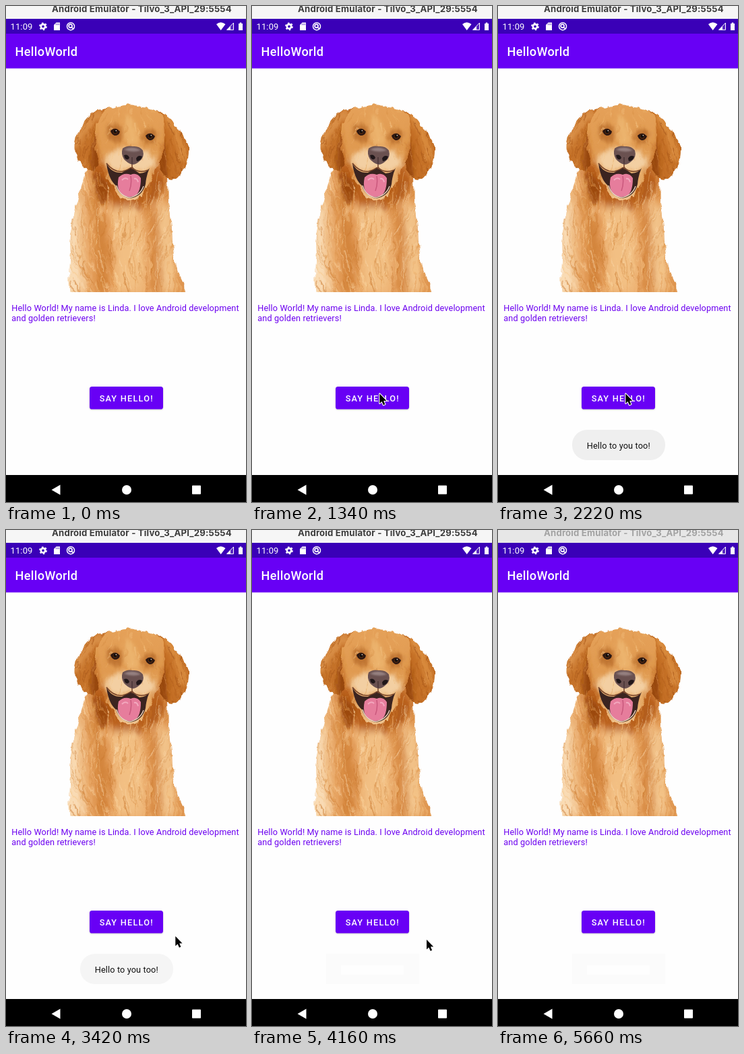
An HTML page for the animation above (5680 ms loop, 356x735 px).

```html
<!DOCTYPE html>
<html lang="en">
<head>
<meta charset="utf-8">
<title>HelloWorld</title>
<style>
  html, body { margin: 0; width: 100%; height: 100%; overflow: hidden; background: #fefefe; }
  svg { display: block; width: 100vw; height: 100vh; }
  text { font-family: Roboto, sans-serif; font-size: 12.7px; letter-spacing: .13px; white-space: pre; }
  .medium { font-weight: 500; fill: #fff; }
  #windowTitle { font: 700 13.2px Inter, sans-serif; letter-spacing: .17px; }
</style>
</head>
<body>
<svg viewBox="0 0 356 735">
  <defs>
    <filter id="soft" x="-30%" y="-30%" width="160%" height="160%"><feGaussianBlur stdDeviation="3"/></filter>
    <filter id="softer" x="-40%" y="-40%" width="180%" height="180%"><feGaussianBlur stdDeviation="6"/></filter>
    <filter id="shadow" x="-10%" y="-20%" width="120%" height="160%"><feGaussianBlur stdDeviation=".9"/></filter>
    <filter id="shaggy" x="-5%" y="-5%" width="110%" height="110%" color-interpolation-filters="sRGB">
      <feTurbulence type="fractalNoise" baseFrequency=".14 .06" numOctaves="2" seed="4"/>
      <feDisplacementMap in="SourceGraphic" scale="8" xChannelSelector="R" yChannelSelector="G"/>
    </filter>
    <linearGradient id="coat" x1="0" x2="1">
      <stop offset="0" stop-color="#f3c894"/><stop offset=".25" stop-color="#e49a55"/>
      <stop offset=".6" stop-color="#eaa968"/><stop offset="1" stop-color="#dc9048"/>
    </linearGradient>
    <linearGradient id="face" x1="0" y1="0" x2="0" y2="1">
      <stop offset="0" stop-color="#e5a159"/><stop offset=".45" stop-color="#e09a50"/>
      <stop offset="1" stop-color="#edba7e"/>
    </linearGradient>
    <path id="bodyShape" d="M130 222Q111 252 110 276Q99 304 97 330Q93 348 95 366Q92 396 95 430H268Q263 406 254 394Q249 376 247 352Q246 318 241 292Q240 268 240 235Z"/>
    <path id="headShape" d="M146 153Q160 150 176 147Q186 145 198 149Q217 151 230 160Q236 178 235 198Q234 224 222 240Q216 260 207 270Q200 288 182 289Q165 286 158 266Q145 252 140 236Q130 214 134 186Q136 164 146 153Z"/>
    <path id="leftEar" d="M152 151Q138 151 128 159Q112 173 106 190Q99 205 103 217Q105 233 119 242Q131 246 138 236Q146 212 144 192Q144 171 152 151Z"/>
    <path id="rightEar" d="M222 154Q242 162 250 176Q264 192 271 207Q272 224 266 240Q258 255 246 258Q235 255 228 240Q225 221 227 200Q227 174 222 154Z"/>
    <clipPath id="bodyClip"><use href="#bodyShape"/></clipPath>
    <clipPath id="headClip"><use href="#headShape"/></clipPath>
    <clipPath id="leftClip"><use href="#leftEar"/></clipPath>
    <clipPath id="rightClip"><use href="#rightEar"/></clipPath>
    <clipPath id="photoClip"><rect x="85" y="140" width="195" height="284"/></clipPath>
  </defs>

  <rect width="356" height="735" fill="#fefefe"/>
  <rect id="titleBar" width="356" height="19"/>
  <text id="windowTitle" x="68" y="9">Android Emulator - Tilvo_3_API_29:5554</text>

  <rect y="19" width="356" height="22.5" fill="#3a00b7"/>
  <rect y="41" width="356" height="51.5" fill="#6800f5"/>
  <text x="6.5" y="35" fill="#fff" style="font-size:13px">11:09</text>
  <g fill="none" stroke="#fff">
    <circle cx="55" cy="30.3" r="3.2" stroke-width="2.6"/>
    <circle cx="55" cy="30.3" r="5" stroke-width="1.8" stroke-dasharray="2.5 2.736"/>
    <circle cx="96" cy="30.2" r="5.5" stroke-width="1.5"/>
    <circle cx="95.6" cy="29.6" r="2.5" stroke-width="1.7"/>
    <path d="M97 31L100.3 34.5" stroke-width="1.7"/>
  </g>
  <path d="M74.5 24.5H80V36H71V28ZM312 27Q318.5 21.5 325.5 27L318.7 36ZM345 26H346.7V24.5H349.3V26H351V36H345Z" fill="#fff"/>
  <path d="M327.5 35.3L337.5 25V35.3Z" fill="#fff" fill-opacity=".15" stroke="#fff"/>
  <path d="M328 35.3L333 30V35.3Z" fill="#fff"/>
  <path d="M74.3 26V28.3M76.4 26V28.3M78.4 26V28.3" stroke="#3a00b7" stroke-width=".7"/>
  <text class="medium" x="13.5" y="74" style="font-size:18.13px;letter-spacing:.35px">HelloWorld</text>

  <g clip-path="url(#photoClip)">
    <g filter="url(#shaggy)">
      <use href="#bodyShape" fill="url(#coat)"/>
      <g clip-path="url(#bodyClip)">
        <g filter="url(#softer)">
          <path d="M122 230Q140 296 184 306Q226 296 240 258L225 230Z" fill="#b9601b"/>
          <path d="M150 300Q166 334 160 424H202Q212 350 192 296Z" fill="#f2bf83"/>
          <path d="M226 290Q220 350 232 424H252L246 300Z" fill="#f3c48b"/>
          <path d="M206 300Q224 350 214 424H228Q232 350 222 296Z" fill="#d38238"/>
          <path d="M120 284Q142 340 134 424H150Q158 340 132 276Z" fill="#d08139"/>
          <path d="M108 290Q104 350 116 424H88V320Z" fill="#f9dcb6"/>
        </g>
        <path d="M132 242Q126 270 142 294Q155 285 152 262Z" fill="#9c480f" filter="url(#soft)"/>
        <path d="M213 260Q212 284 203 297Q226 288 230 258Z" fill="#b35d1a" filter="url(#soft)"/>
        <g id="bodyFur" fill="none" stroke-linecap="round"></g>
      </g>

      <use href="#leftEar" fill="#c57229"/>
      <g clip-path="url(#leftClip)">
        <path d="M136 180Q126 205 126 248H146V180Z" fill="#97470f" filter="url(#soft)"/>
        <path d="M102 210Q112 180 140 158" fill="none" stroke="#d98f47" stroke-width="12" filter="url(#soft)"/>
        <g id="leftFur" fill="none"></g>
      </g>
      <use href="#rightEar" fill="#c46f25"/>
      <g clip-path="url(#rightClip)">
        <path d="M228 180Q244 215 238 260H222Z" fill="#97470f" filter="url(#soft)"/>
        <path d="M236 160Q258 190 264 230" fill="none" stroke="#d98b3e" stroke-width="11" filter="url(#soft)"/>
        <g id="rightFur" fill="none"></g>
      </g>

      <use href="#headShape" fill="url(#face)"/>
      <g clip-path="url(#headClip)">
        <g filter="url(#soft)">
          <path d="M130 170Q136 226 150 244L155 258L130 252ZM238 168Q232 228 216 256L226 258L242 226Z" fill="#c16b22"/>
          <path d="M178 158Q196 170 197 206H180Q174 180 178 158Z" fill="#ecb36d"/>
          <path d="M150 178Q159 171 169 177Q178 195 170 202Q154 203 150 190ZM204 186Q216 179 223 187Q225 199 214 205Q201 202 201 193Z" fill="#bf7430"/>
          <path d="M173 211Q148 215 147 231Q159 250 184 240Q207 251 222 235Q219 217 200 211Z" fill="#f3cfa2"/>
          <path d="M167 282Q185 295 200 280L202 290H167Z" fill="#f4d7ae"/>
        </g>
        <g id="headFur" fill="none"></g>
      </g>
    </g>

    <path d="M149 233Q156 248 172 247L185 239L198 248Q209 247 213 240Q208 251 207 264Q202 283 183 285Q167 281 163 266Q152 257 149 233Z" fill="#3b2420"/>
    <path d="M167 254Q175 246 185 250Q194 246 200 255Q200 274 193 280Q183 286 173 280Q163 272 167 254Z" fill="#e67d9c"/>
    <path d="M185 252Q187 264 183 274" fill="none" stroke="#c9587c" stroke-width="1.5"/>
    <path d="M172 258Q177 253 181 257M190 256Q195 255 196 261" fill="none" stroke="#f3a9bf" stroke-width="2"/>
    <path d="M164 266Q168 281 183 284Q199 281 204 267" fill="none" stroke="#ead2bd" stroke-width="1.4"/>
    <path d="M187 232V242M149 233Q160 247 173 245Q181 243 187 239Q196 249 211 243" fill="none" stroke="#744229" stroke-width="1.5"/>
    <path d="M173 211Q180 206 188 208Q198 207 203 214Q206 224 198 230Q193 235 187 235Q179 232 175 227Q170 219 173 211Z" fill="#6a5150"/>
    <path d="M175 213Q187 206 200 214Q188 218 175 213Z" fill="#948080" filter="url(#shadow)"/>
    <path d="M175 221Q181 219 183 225Q180 230 176 225ZM193 226Q196 220 202 223Q200 230 194 230Z" fill="#201719"/>
    <path d="M187 224V234" stroke="#382728"/>
    <g fill="#2a1611">
      <path d="M155 185Q162 178 169 186Q168 192 161 192Q156 190 155 185Z"/>
      <path d="M207 192Q214 185 221 193Q219 199 213 199Q208 197 207 192Z"/>
    </g>
    <g fill="#53290f"><circle cx="162" cy="186.5" r="3.2"/><circle cx="214" cy="193.5" r="3.2"/></g>
    <g fill="#110d0c"><circle cx="162" cy="186" r="2.4"/><circle cx="214" cy="193" r="2.4"/></g>
    <g fill="#fff"><circle cx="163.3" cy="184.7" r=".8"/><circle cx="215.3" cy="191.7" r=".8"/></g>
  </g>

  <g fill="#6c00f0">
    <text x="8.3" y="452">Hello World! My name is Linda. I love Android development</text>
    <text x="8.3" y="467">and golden retrievers!</text>
  </g>

  <rect x="124" y="565" width="109" height="33.3" rx="3.6" fill="#000" opacity=".22" filter="url(#shadow)"/>
  <rect id="button" x="124" y="564" width="109" height="33.5" rx="3.6"/>
  <text class="medium" x="138.7" y="585.5" style="letter-spacing:1.24px">SAY HELLO!</text>

  <rect id="toast" x="110" y="628" width="138" height="45"/>
  <rect id="toastGap" x="132" y="645" width="93" height="14" fill="#fefefe"/>
  <text id="toastText" x="131.8" y="655.5" fill="#111">Hello to you too!</text>

  <rect y="695" width="356" height="40" fill="#000"/>
  <g fill="#fff">
    <path d="M67.5 717L80.5 709.5V724.5Z"/>
    <circle cx="179" cy="717" r="7"/>
    <rect x="276" y="710.5" width="13" height="13" rx=".8"/>
  </g>
  <path id="cursor" d="M0 0V14.5L3.3 11.5L5.6 16.8L8.1 15.7L5.9 10.5H10.2Z" fill="#000" stroke="#fff" stroke-width="2.2" paint-order="stroke" stroke-linejoin="round"/>
</svg>
<script>
const LOOP = 5680;
const $ = id => document.getElementById(id);

// Each entry holds from its time until the next one.
const cursorPath = [
  [0], [600, 162.5, 660.5], [740, 172.5, 584.5], [890, 188.5, 576], [1040, 189.3, 574.5],
  [3120, 204.5, 578.5], [3270, 233, 589.5], [3420, 251.3, 602], [3570, 259, 607],
  [4460, 261.5, 607.5], [4610, 317.5, 637.5], [4760, 329.5, 695.5], [4910, 329.5, 732], [5060]
];
const textFade = [
  [0, 0], [1630, .25], [1780, .5], [1930, .7], [2070, .88], [2220, 1],
  [3570, .8], [3710, .58], [3860, .36], [4010, .16], [4160, 0]
];
const toastFill = [[0, 'none'], [1630, '#efefef'], [3420, '#f5f5f5'], [3570, '#fbfbfb']];

const stepAt = (steps, t) => steps.findLast(step => step[0] <= t);
const set = (id, attrs) => {
  for (const name in attrs) $(id).setAttribute(name, attrs[name]);
};

function seeded(seed) {
  return () => (seed = (seed * 16807) % 2147483647) / 2147483647;
}

function growFur(id, count, [x, y, w, h], length, colors, lean) {
  const random = seeded(count * 97 + x);
  let strands = '';
  for (let i = 0; i < count; i++) {
    const sx = x + random() * w, sy = y + random() * h;
    const size = length * (.5 + random());
    const dx = lean(sx, sy) * size, bend = (random() - .5) * size * .5;
    const color = colors[Math.floor(random() * colors.length)];
    strands += `<path d="M${sx} ${sy}q${bend} ${size / 2} ${dx} ${size}" stroke="${color}"
      stroke-width="${.6 + random() * 1.4}" opacity="${.15 + random() * .35}"/>`;
  }
  $(id).innerHTML = strands;
}

const earColors = ['#94450f', '#df9a54', '#b3611d'];
growFur('bodyFur', 420, [90, 245, 178, 175], 24, ['#fbdcb0', '#c67429', '#f5c486', '#dc9045'],
  (x, y) => (180 - x) / 260 + Math.sin(y / 28) * .25);
growFur('leftFur', 80, [100, 150, 45, 90], 14, earColors, () => -.3);
growFur('rightFur', 80, [228, 155, 45, 100], 14, earColors, () => .3);
growFur('headFur', 110, [132, 146, 104, 140], 9, ['#f4c78a', '#c97d35', '#edb56e'],
  x => (x - 184) / 60);

function draw(t) {
  const [, x, y] = stepAt(cursorPath, t);
  set('cursor', x === undefined ? { visibility: 'hidden' }
    : { visibility: 'visible', transform: `translate(${x} ${y})` });

  const faded = t >= 4160;
  set('toast', { fill: stepAt(toastFill, t)[1], rx: faded ? 0 : 22 });
  set('toastGap', { visibility: faded ? 'visible' : 'hidden' });
  set('toastText', { opacity: stepAt(textFade, t)[1] });
  set('button', { fill: t >= 1630 && t < 1780 ? '#7a26f6' : '#6800f5' });

  const inactive = t >= 5660;
  set('titleBar', { fill: inactive ? '#e7e7e7' : '#f6f6f6' });
  set('windowTitle', { fill: inactive ? '#a3a3a3' : '#3d3d3d' });
}

const start = performance.now();
function tick() {
  draw((performance.now() - start) % LOOP);
  requestAnimationFrame(tick);
}
tick();
</script>
</body>
</html>
```
